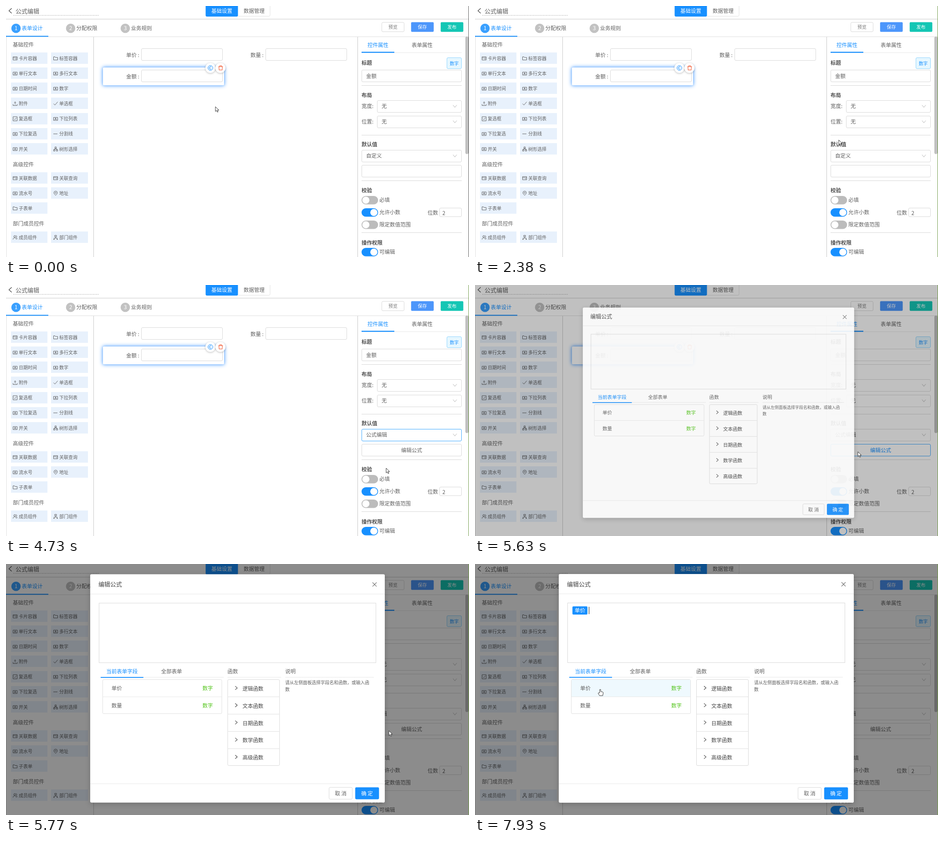
Recreate the animation shown at these times as an HTML page. Size 1017 by 551 pixels, loop 8 s.

```html
<!DOCTYPE html>
<html lang="zh-CN">
<head>
<meta charset="utf-8">
<style>
  html, body { margin: 0; width: 100%; height: 100%; overflow: hidden; background: #fff; }
  svg { display: block; font-family: "Noto Sans CJK SC", "Noto Sans CJK", "Noto Sans", sans-serif; }
  text { white-space: pre; }
  .glow { filter: drop-shadow(0 0 4px #69aeff) drop-shadow(0 0 2px #a9d0ff); }
  .soft { filter: drop-shadow(0 1px 2px #0004); }
  .modal-shadow { filter: drop-shadow(0 3px 6px #0003); }
</style>
</head>
<body>
<svg id="stage" width="1017" height="551"></svg>
<script>
const BLUE = '#1890ff', GREY = '#606060', BORDER = '#d9d9d9', RULE = '#d8d8d8';

// Text is placed by its left edge and vertical centre.
const text = (x, y, s, { size = 11.5, fill = GREY, more = '' } = {}) =>
  `<text x="${x}" y="${y + size * .37}" font-size="${size}" fill="${fill}" ${more}>${s}</text>`;
const bold = (x, y, s) => text(x, y, s, { fill: '#505050', more: 'font-weight="700"' });
const centred = (x, y, s, size, fill) => text(x, y, s, { size, fill, more: 'text-anchor="middle"' });
const fillRect = (x, y, w, h, fill, r = 0, more = '') =>
  `<rect x="${x}" y="${y}" width="${w}" height="${h}" rx="${r}" fill="${fill}" ${more}/>`;
const box = (x, y, w, h, { stroke = BORDER, fill = '#fff', r = 2.5, more = '' } = {}) =>
  fillRect(x + .5, y + .5, w - 1, h - 1, fill, r, `stroke="${stroke}" ${more}`);
const path = (d, stroke = '#555', width = 1, more = '') =>
  `<path d="${d}" fill="none" stroke="${stroke}" stroke-width="${width}" ${more}/>`;
const hLine = (x1, x2, y, stroke = RULE) => path(`M${x1} ${y + .5}H${x2}`, stroke);
const group = (id, body, more = '') => `<g id="${id}" ${more}>${body}</g>`;
const down = (x, y, stroke = '#b5b5b5') => path(`M${x - 4} ${y - 2.5}l4 5 4-5`, stroke);
const right = (x, y) => path(`M${x - 2} ${y - 4}l4.5 4-4.5 4`, '#444', 1.1);

const icons = {
  card: 'M.5 1.5h9v7h-9zM.5 4h9M6 6.3h2',
  folder: 'M.5 1.5h3l1 1.5h5v5.5h-9z',
  field: 'M.5 2h9v6.5h-9zM3 7.2l2-4 2 4M3.8 5.8h2.4',
  upload: 'M.5 6v3h9v-3M5 7V1M3 3l2-2 2 2',
  tick: 'M.5 5l3 3 6-7',
  checkbox: 'M.5.5h9v9h-9zM2.5 5l2 2 3-4',
  minus: 'M0 5h9',
  tree: 'M3.5.5h3v3h-3zM.5 6.5h3v3h-3zM6.5 6.5h3v3h-3zM5 3.5V5M2 6.5V5h6v1.5',
  pin: 'M5 9.5C2 6.5 1.2 5 1.2 4a3.8 3.8 0 0 1 7.6 0c0 1-.8 2.5-3.8 5.5zM5 2.8a1.2 1.2 0 1 0 .01 0',
  user: 'M4 1a2 2 0 1 0 .01 0M.5 9.5c0-5 7-5 7 0M6.5 1c3 0 3 4 .5 4 1.5.5 2.5 2 2.5 4',
  dept: 'M3 .5h4v3H3zM5 3.5v3M1.5 9V6.5h7V9M0 9.5h3M7 9.5h3'
};

const palette = [
  ['基础控件', 85, 115, [['card', '卡片容器'], ['folder', '标签容器'], ['field', '单行文本'], ['field', '多行文本'],
    ['field', '日期时间'], ['field', '数字'], ['upload', '附件'], ['tick', '单选框'], ['checkbox', '复选框'],
    ['field', '下拉列表'], ['field', '下拉复选'], ['minus', '分割线'], ['field', '开关'], ['tree', '树形选择']]],
  ['高级控件', 348, 378, [['card', '关联数据'], ['card', '关联查询'], ['field', '流水号'], ['pin', '地址'], ['folder', '子表单']]],
  ['部门成员控件', 478, 508, [['user', '成员组件'], ['dept', '部门组件']]]
];

function header() {
  const step = (x, n, label, active) =>
    `<circle cx="${x}" cy="49" r="10.3" fill="${active ? '#3aa0ff' : '#c2c2c2'}"/>` +
    centred(x, 49, n, 12, '#fff') + text(x + 12.5, 49, label, { fill: active ? BLUE : GREY });
  return path('M12.5 5l-6 5.5 6 5.5', '#444', 1.2) +
    text(21, 11, '公式编辑', { size: 13 }) +
    path('M16 20.5H205', '#b0b0b0', 1, 'stroke-dasharray="2 1.5"') +
    box(508, -4, 72.5, 27, { stroke: '#e2e2e2' }) + fillRect(438.5, -4, 71, 27.3, BLUE, 3) +
    text(451, 11, '基础设置', { fill: '#fff' }) + text(522, 11, '数据管理') +
    hLine(0, 1017, 28, '#dcdcdc') + hLine(0, 1017, 29, '#ececec') +
    step(22, 1, '表单设计', true) + step(142, 2, '分配权限') + step(262, 3, '业务规则') +
    hLine(0, 1017, 67, '#dedede') + fillRect(0, 65.5, 93, 2, BLUE) +
    box(825, 35.5, 50, 21.5) + centred(850, 46.5, '预览', 10, '#777') +
    fillRect(889.8, 35.5, 49.7, 21.3, '#4c96fb', 2) + centred(914.5, 46.5, '保存', 10, '#fff') +
    fillRect(954.8, 35.5, 49.7, 21.3, '#14c6b4', 2) + centred(979.5, 46.5, '发布', 10, '#fff');
}

function sidebar() {
  const items = palette.map(([title, titleY, firstY, list]) => text(15, titleY, title) +
    list.map(([icon, label], i) => {
      const col = i % 2, x = col ? 99 : 11, y = firstY + (i >> 1) * 33.15;
      const iconX = col ? 104 : 15;
      return fillRect(x, Math.round(y - 13), col ? 81 : 80, 25, '#e8f1fc') +
        path(icons[icon], '#555', .9, `transform="translate(${iconX} ${y - 5})"`) +
        text(iconX + 13, y, label, { size: 10 });
    }).join('')).join('');
  return path('M.5 68V551', '#ddd') + path('M192.5 68V551', '#c8c8c8') + items;
}

function canvasArea() {
  const badge = x => `<circle class="soft" cx="${x}" cy="136" r="11" fill="#fff"/>`;
  return text(264, 107.5, '单价 :') + box(297, 93, 179, 27) +
    text(537, 107.5, '数量 :') + box(570, 93, 179, 27) +
    fillRect(213, 135, 266, 39, '#fff', 2, 'class="glow"') +
    text(264, 154.5, '金额 :') + box(297, 140, 179, 27) +
    badge(449) + badge(471) +
    `<circle cx="449" cy="136" r="5.3" fill="none" stroke="${BLUE}"/>` +
    path('M451 134.4a2.5 2.5 0 1 0 0 3.2', BLUE, 1.1) +
    path('M466.5 133h10M469.5 133v-1.8h4v1.8M467.7 133l.5 7.5h6.6l.5-7.5', '#f0562f', 1.1);
}

function properties() {
  const toggle = (y, on) => fillRect(781, y, 36.3, 18.5, on ? BLUE : '#bcbcbc', 9.2) +
    `<circle cx="${on ? 808 : 790.5}" cy="${y + 9.2}" r="7.8" fill="#fff"/>`;
  return path('M772.5 68V551', '#c8c8c8') +
    text(794, 86, '控件属性', { fill: BLUE }) + text(891, 86, '表单属性') +
    hLine(781, 1001, 102, '#e8e8e8') + fillRect(781, 100.5, 72, 2.3, BLUE) +
    bold(781, 125, '标题') + box(968, 113, 33, 25, { stroke: '#91d5ff', fill: '#e6f7ff' }) +
    centred(984.5, 126, '数字', 9.8, BLUE) +
    box(781, 140, 220, 27) + text(791, 154, '金额') +
    [174, 283, 383, 497].map(y => hLine(781, 1001, y)).join('') +
    bold(781, 196, '布局') +
    [['宽度:', 220], ['位置:', 254]].map(([label, y]) => text(781, y, label) +
      box(815, y - 13, 186, 27) + text(825, y, '无') + down(986, y)).join('') +
    bold(781, 304, '默认值') +
    box(781, 316, 220, 27, { more: 'id="select"' }) +
    text(791, 329, '自定义', { more: 'id="selectText"' }) + down(986, 329) +
    box(781, 349, 220, 27, { more: 'id="button"' }) +
    text(891, 363, '编辑公式', { more: 'id="buttonText" text-anchor="middle"' }) +
    bold(781, 405, '校验') +
    toggle(417) + text(820, 426, '必填') +
    toggle(444, true) + text(820, 453, '允许小数') +
    text(926, 454, '位数') + box(952, 443, 49, 20) + text(958.5, 454.8, '2') +
    toggle(471) + text(820, 479.5, '限定数值范围') +
    bold(781, 519.5, '操作权限') + toggle(531, true) + text(820, 539.5, '可编辑') +
    fillRect(1009, 67, 7, 258, '#c1c1c1', 3.5) + fillRect(1016, 0, 1, 551, '#5a5a5a', 0, 'id="edge"');
}

function dropdown() {
  return fillRect(781, 344, 220, 78, '#fff', 2, 'class="soft"') +
    fillRect(782, 346, 218, 25, '#e6f7ff') + bold(791, 358.5, '自定义') +
    text(791, 384.5, '数据联动') + text(791, 410, '公式编辑');
}

function modal() {
  const light = '#e8e8e8', rowHeight = 37.9;
  const functions = ['逻辑函数', '文本函数', '日期函数', '数学函数', '高级函数'];
  const field = (y, name) => text(231, y, name) + text(431, y, '数字', { fill: '#52c41a' });
  return fillRect(184, 22, 648, 502, '#fff', 3, 'class="modal-shadow"') +
    text(202, 44, '编辑公式', { size: 13, fill: '#444' }) +
    path('M805 40l9 9M814 40l-9 9', '#777', 1.2) + hLine(184, 832, 65, light) +
    box(203, 85, 610, 132, { r: 0 }) +
    hLine(207, 478, 248, light) + hLine(486, 604, 248, light) + hLine(613, 808, 248, light) +
    text(219.5, 236, '当前表单字段', { fill: BLUE }) + fillRect(207, 247.8, 94, 1.9, BLUE) +
    text(340, 236, '全部表单') + text(486, 236, '函数') + text(613, 236, '说明') +
    box(211, 253, 263, 76, { stroke: '#e0e0e0' }) +
    fillRect(212, 254, 261, 37, '#eff9fe', 0, 'id="rowHover"') +
    hLine(212, 473, 291, light) + field(273, '单价') + field(310.5, '数量') +
    box(486, 253, 115, 190, { stroke: BORDER }) +
    functions.map((name, i) => {
      const y = 273 + i * rowHeight;
      return (i ? hLine(487, 600, Math.round(253 + i * rowHeight), '#e0e0e0') : '') +
        right(505, y - 1) + text(519, y + .5, name, { fill: '#444' });
    }).join('') +
    text(613, 260.5, '请从左侧面板选择字段名和函数，或输入函', { size: 9.75 }) +
    text(613, 275, '数', { size: 9.75 }) +
    hLine(184, 832, 482, light) +
    box(709, 490, 52, 27) + centred(735, 504, '取 消', 11.5, GREY) +
    fillRect(767, 490.3, 52.3, 26.5, BLUE, 2.5) + centred(793, 504, '确 定', 11.5, '#fff') +
    group('tag', fillRect(214, 93, 33, 18, BLUE, 2) + text(219, 102, '单价', { fill: '#fff' })) +
    fillRect(0, 94, 1, 16, '#222', 0, 'id="caret"');
}

const stage = document.getElementById('stage');
stage.innerHTML = header() + sidebar() + canvasArea() + properties() + group('menu', dropdown()) +
  fillRect(0, 0, 1016, 551, '#000', 0, 'id="mask"') + group('modal', modal()) +
  group('cursor',
    '<path id="arrow" d="M0 0V10.5L2.5 8.2 4.2 12 6 11.2 4.4 7.6H7.6Z"/>' +
    '<path id="hand" d="M-1.2 8V.8Q0-.6 1.2.8V5L5.6 6Q6.8 6.4 6.6 8L5.6 14H-1.4L-4.4 9.2Q-4.6 7.6-3 7.8Z"/>',
    'fill="#fff" stroke="#222" stroke-width=".9"');

const el = id => document.getElementById(id);
const show = (id, on) => el(id).setAttribute('display', on ? 'inline' : 'none');
const set = (id, name, value) => el(id).setAttribute(name, value);
const ramp = (t, from, to) => Math.min(1, Math.max(0, (t - from) / (to - from)));

// Cubic bezier (.08, .82, .17, 1), solved for x by bisection.
function easeOutCirc(x) {
  const bezier = (s, a, b) => 3 * a * s * (1 - s) ** 2 + 3 * b * s * s * (1 - s) + s ** 3;
  let low = 0, high = 1;
  for (let i = 0; i < 20; i++) {
    const mid = (low + high) / 2;
    if (bezier(mid, .08, .17) < x) low = mid; else high = mid;
  }
  return bezier(high, .82, 1);
}

// Each move: start ms, end ms, x, y.
const moves = [
  [50, 380, 278, 152], [1620, 2380, 799, 294], [2430, 2950, 826, 324], [3320, 4010, 836, 405],
  [4250, 4540, 835, 402], [4730, 5140, 841, 366], [6100, 6840, 340, 276], [7280, 7690, 275, 275]
];
function pointer(t) {
  let x = 460, y = 221;
  for (const [from, to, endX, endY] of moves) {
    const u = ramp(t, from, to), k = u * u * (3 - 2 * u);
    x += (endX - x) * k;
    y += (endY - y) * k;
  }
  return [x, y];
}

const modalStart = 5541, modalEnd = 5806;

function draw(t) {
  const [x, y] = pointer(t);
  const chosen = t >= 4300, opened = t >= modalStart, inserted = t >= 7930;
  const onSelect = t > 2430 && t < 4400 && y > 316;
  const onButton = t > 4730 && t < 5700 && y < 376;
  const hand = onSelect || (onButton && !opened) || (t > 6100 && x < 601);

  set('cursor', 'transform', `translate(${x} ${y})`);
  show('arrow', !hand);
  show('hand', hand);
  set('edge', 'fill', t < 1060 ? '#5a5a5a' : '#6f9a45');

  set('select', 'stroke', onSelect || (chosen && t < 5390) ? '#40a9ff' : BORDER);
  el('selectText').textContent = chosen ? '公式编辑' : '自定义';
  const menu = ramp(t, 3000, 3200) * (1 - ramp(t, 4300, 4500));
  show('menu', menu > 0);
  set('menu', 'opacity', menu);
  set('menu', 'transform', `translate(0 ${344 * (1 - menu) * .2}) scale(1 ${.8 + .2 * menu})`);

  show('buttonText', chosen);
  set('button', 'stroke', onButton ? '#40a9ff' : BORDER);
  set('buttonText', 'fill', onButton ? BLUE : GREY);

  const zoom = easeOutCirc(ramp(t, modalStart, modalEnd)), scale = .2 + .8 * zoom;
  set('mask', 'opacity', .45 * ramp(t, 5490, 5746));
  show('modal', opened);
  set('modal', 'opacity', zoom);
  set('modal', 'transform', `translate(842 366) scale(${scale}) translate(-842 -366)`);

  show('rowHover', t > 6100 && x < 474 && y < 291);
  show('tag', inserted);
  show('caret', inserted || (t > 6300 && (t - 6300) % 1060 < 530));
  set('caret', 'x', inserted ? 250 : 212);
}

function frame() {
  draw(performance.now() % 8000);
  requestAnimationFrame(frame);
}
frame();
</script>
</body>
</html>
```
